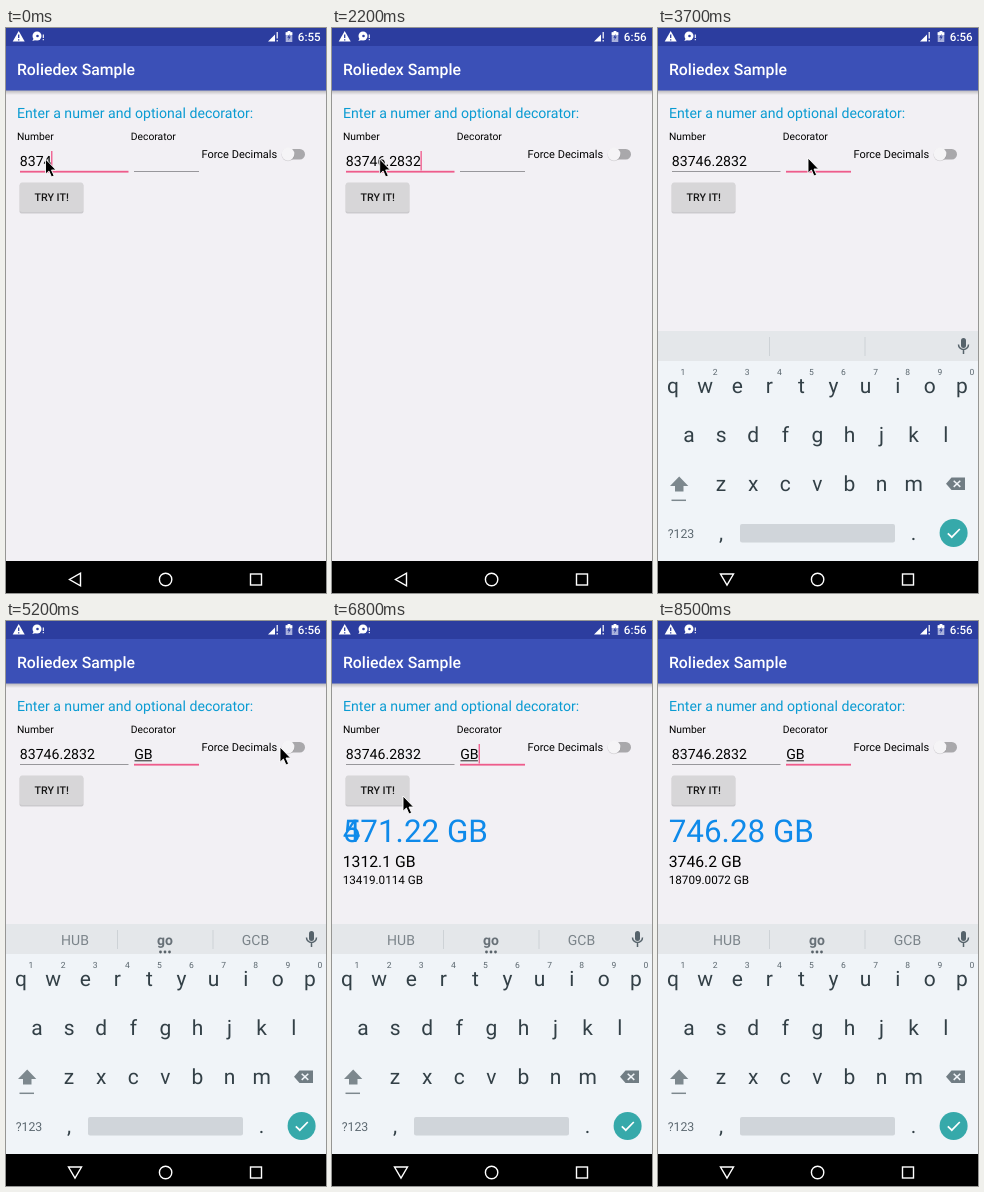
Animation, 320 px wide and 565 px high, one loop 8600 ms. Source, as an HTML page:

```html
<!DOCTYPE html>
<html lang="en">
<head>
<meta charset="utf-8">
<title>Rolling numbers</title>
<style>
  html, body { margin: 0; width: 100%; height: 100%; overflow: hidden; background: #f2f0f4; }
  svg { display: block; width: 100%; height: 100%; font-family: Roboto, sans-serif; text-rendering: geometricPrecision; }
  text { white-space: pre; }
  .mid { text-anchor: middle; }
  .med { font-weight: 500; }
</style>
</head>
<body>
<svg viewBox="0 0 320 565">
  <defs>
    <linearGradient id="fade" x2="0" y2="1">
      <stop stop-color="#000" stop-opacity=".25"/>
      <stop offset="1" stop-color="#000" stop-opacity="0"/>
    </linearGradient>
    <clipPath id="above"><rect width="320" height="533"/></clipPath>
  </defs>
  <rect width="320" height="565" fill="#f2f0f4"/>
  <rect y="62" width="320" height="5" fill="url(#fade)"/>
  <rect y="18" width="320" height="44.5" fill="#3b50b7"/>
  <rect width="320" height="18" fill="#2c3d9f"/>

  <!-- status bar -->
  <path d="M12.7 3 18.7 13.6H6.7Z" fill="#fff"/>
  <path d="M12.7 6.5V10M12.7 11.2V12.4" stroke="#2c3d9f" stroke-width="1.3"/>
  <circle cx="31" cy="8" r="4.5" fill="#fff"/>
  <path d="M28 10 26.3 13 30 12Z" fill="#fff"/>
  <circle cx="31.5" cy="8" r="1.3" fill="#2c3d9f"/>
  <path d="M37.3 6.5V10M37.3 11V12.2" stroke="#fff" stroke-width="1.1"/>
  <path d="M269 6.5V13.5H262Z" fill="#fff"/>
  <path d="M271.2 4V10.5M271.2 12V13.5" stroke="#fff" stroke-width="1.2"/>
  <path d="M281.7 3h2.6v1.3h2V14h-6.6V4.3h2Z" fill="#a9b1dc"/>
  <path d="M281.7 3h2.6v1.3h2V7h-6.6V4.3h2Z" fill="#fff"/>
  <path d="M283.7 5.7 281.3 9.7H282.8L282.3 12.5 284.8 8.6H283.2Z" fill="#2c3d9f"/>
  <text id="clock" class="med" x="291.8" y="13" font-size="11.6" fill="#fff"></text>

  <!-- form -->
  <text class="med" x="11" y="46.7" font-size="15.8" fill="#fff">Roliedex Sample</text>
  <text x="11" y="90" font-size="14.12" fill="#0a9bd2">Enter a numer and optional decorator:</text>
  <g fill="#000">
    <text x="11" y="112" font-size="10.3">Number</text>
    <text x="124.8" y="112" font-size="10.3">Decorator</text>
    <text x="195.5" y="130" font-size="11">Force Decimals</text>
    <text id="number" x="13.8" y="138" font-size="14.12"></text>
    <text id="unit" x="128.2" y="138" font-size="14.12"></text>
  </g>
  <rect id="numberLine" x="14" width="108.5"/>
  <rect id="unitLine" x="128" width="65"/>
  <rect id="compose" x="128.5" y="139.3" height="1" fill="#222"/>
  <rect id="caret" y="123" width="1.3" height="19.5" fill="#f0578a"/>
  <rect x="277" y="121" width="22" height="10.4" rx="5.2" fill="#a9a8ab"/>
  <circle cx="282" cy="126.6" r="6.6" fill="#000" opacity=".12"/>
  <circle cx="282" cy="126" r="6.4" fill="#f5f4f6"/>
  <rect x="13.5" y="155.5" width="64" height="30" rx="2" fill="#000" opacity=".16"/>
  <rect id="button" x="14" y="154.5" width="63" height="29.5" rx="1.8"/>
  <text class="mid med" x="45.7" y="173" font-size="10.7" fill="#161616">TRY IT!</text>

  <!-- results -->
  <g id="results">
    <text id="big" x="10.7" y="221" font-size="31.4" fill="#0e8aea"></text>
    <text id="ghost" x="10.7" y="221" font-size="31.4" fill="#0e8aea"></text>
    <text id="middle" x="10.7" y="246" font-size="15.75"></text>
    <text id="small" x="10.7" y="263" font-size="11.7"></text>
  </g>

  <!-- keyboard -->
  <g clip-path="url(#above)">
    <g id="keyboard">
      <rect y="303" width="320" height="230" fill="#f0f4f8"/>
      <rect y="303" width="320" height="30" fill="#e4e7ea"/>
      <path d="M111.5 309V328M207 309V328" stroke="#cdd2d6"/>
      <g id="hints" class="mid" font-size="14" fill="#7b848a">
        <text x="69" y="324">HUB</text>
        <text x="159" y="324" font-weight="700" fill="#687178">go</text>
        <text x="249.5" y="324">GCB</text>
        <g fill="#59636a">
          <circle cx="154.5" cy="331" r="1.4"/><circle cx="159" cy="331" r="1.4"/><circle cx="163.5" cy="331" r="1.4"/>
        </g>
      </g>
      <rect x="303" y="310" width="5" height="10" rx="2.5" fill="#56636b"/>
      <path d="M300.5 316.5a5 5 0 0 0 10 0M305.5 321.5V326" fill="none" stroke="#56636b" stroke-width="1.5"/>
      <g id="keys" class="mid" fill="#334047"></g>
      <path d="M21.2 448.5 30.3 458H25.5V463.5H17V458H12Z" fill="#7d888e"/>
      <path d="M13.5 472.3H28" stroke="#7d888e" stroke-width="1.5"/>
      <path d="M293.5 449.5H307V462H293.5L288 455.7Z" fill="#717d84"/>
      <path d="M295.7 452.7 302.3 458.9M302.3 452.7 295.7 458.9" stroke="#f0f4f8" stroke-width="1.5"/>
      <rect x="82" y="496" width="155" height="18.5" rx="2" fill="#d0d5da"/>
      <circle cx="295.6" cy="505" r="14" fill="#36a9aa"/>
      <path d="M289.8 505.3 293.8 509.2 301.8 501" fill="none" stroke="#fff" stroke-width="1.7"/>
    </g>
  </g>

  <!-- navigation bar -->
  <rect y="533" width="320" height="32" fill="#000"/>
  <g fill="none" stroke="#fff" stroke-width="1.4">
    <path id="back"/>
    <circle cx="159.6" cy="551.5" r="6.2"/>
    <rect x="244.5" y="546" width="11" height="11"/>
  </g>
  <path id="mouse" d="M0 0V15.2L3.4 12 6 18 8.6 16.8 6 11H10.6Z" fill="#000" stroke="#fff" stroke-width=".9"/>
</svg>
<script>
const LOOP = 8600, STEP = 100, PINK = '#ee5c8b';
const el = id => document.getElementById(id);
const set = (id, attrs) => { for (const k in attrs) el(id).setAttribute(k, attrs[k]); };
const say = (id, s) => { el(id).textContent = s; };
const show = (id, on) => set(id, { visibility: on ? 'visible' : 'hidden' });
const clamp = x => Math.max(0, Math.min(1, x));
const part = (t, a, b) => clamp((t - a) / (b - a));
const ease = x => x * x * (3 - 2 * x);

function key(s, x, y, size, fill) {
  const node = document.createElementNS('http://www.w3.org/2000/svg', 'text');
  const attrs = { x, y, 'font-size': size };
  if (fill) attrs.fill = fill;
  for (const k in attrs) node.setAttribute(k, attrs[k]);
  node.textContent = s;
  el('keys').append(node);
}
const PITCH = 32.1;
[['qwertyuiop', 15, 365], ['asdfghjkl', 31, 414], ['zxcvbnm', 63, 463]].forEach(([row, x, y]) =>
  [...row].forEach((c, i) => key(c, x + PITCH * i, y, 21)));
[...'1234567890'].forEach((c, i) => key(c, 25 + PITCH * i, 347.3, 8.5, '#5a666e'));
key('?123', 23, 509.5, 12.3, '#5c6870');
key(',', 63, 512, 21);
key('.', 255.5, 512, 21);

const numberKeys = [400, 800, 1200, 1500, 1800, 2000];
const unitKeys = [4200, 4600];
const FOCUS = 2800, PRESS = 6300, ROLL = 6400;
const path = [[0, 39.5, 131], [2100, 39.5, 131], [2700, 150, 130], [4600, 150, 130],
  [5200, 274, 126], [5500, 274, 126], [6200, 71, 175], [LOOP, 71, 175]];

const typed = (keys, t) => keys.filter(k => k <= t);

function mouseAt(t) {
  const i = path.findIndex(p => p[0] > t);
  const [a, b] = [path[i - 1], path[i]];
  const f = ease(part(t, a[0], b[0]));
  return [1, 2].map(k => a[k] + (b[k] - a[k]) * f);
}

// Wheels turn upwards and stop on the digits of the goal.
function wheels(goal, turns, left) {
  let i = 0;
  return goal.replace(/\d/g, d => {
    const pos = +d - turns[i++] * left + 1e-6;
    return ((Math.floor(pos) % 10) + 10) % 10;
  });
}

function results(t) {
  const left = 1 - part(t, 6800, 8000) + Math.max(0, 6800 - t) / 1200;
  const first = 7 - 2.5 * left, frac = first - Math.floor(first);
  const big = wheels('746.28', [2.5, 7, 5, 10, 6], left);
  say('big', (frac > .6 ? Math.ceil(first) + big.slice(1) : big) + ' GB');
  say('ghost', frac >= .4 && frac <= .6 ? Math.ceil(first) : '');
  const grown = part(t, ROLL, 7480);
  say('middle', '3746.2'.replace(/\d/g, d => Math.round(d * grown)) + ' GB');
  say('small', wheels('18709.0072', [10, 5, 3, 9, 10, 10, 9, 6, 8], Math.max(0, (8500 - t) / 1700)) + ' GB');
}

function render(t) {
  say('clock', t < 1000 ? '6:55' : '6:56');

  const nums = typed(numberKeys, t), units = typed(unitKeys, t);
  const number = '83746.2832'.slice(0, 4 + nums.length);
  const unit = 'GB'.slice(0, units.length);
  say('number', number);
  say('unit', unit);

  const inUnit = t >= FOCUS;
  const line = on => on ? { y: 142.8, height: 1.8, fill: PINK } : { y: 143, height: 1, fill: '#98979b' };
  set('numberLine', line(!inUnit));
  set('unitLine', line(inUnit));
  const width = id => el(id).textContent ? el(id).getComputedTextLength() : 0;
  set('compose', { width: Math.max(0, width('unit') - 1) });
  set('caret', { x: inUnit ? 128.2 + width('unit') : 13.4 + width('number') });
  const since = Math.max(0, inUnit ? FOCUS : 0, ...(inUnit ? units : nums));
  show('caret', (t - since) % 1000 < 500);

  const rise = 1 - (1 - part(t, 3000, 3400)) ** 2;
  set('keyboard', { transform: `translate(0 ${230 * (1 - rise)})` });
  show('keyboard', rise > 0);
  set('hints', { display: units.length ? 'inline' : 'none' });
  set('back', { d: rise > 0 ? 'M62.5 546H75.5L69 557Z' : 'M74.5 545.2V557.8L63.5 551.5Z' });

  set('button', { fill: t >= PRESS && t < PRESS + 200 ? '#c4c3c5' : '#d7d6d8' });
  show('results', t >= ROLL);
  if (t >= ROLL) results(t);

  set('mouse', { transform: `translate(${mouseAt(t)})` });
  show('mouse', t < 7800);
}

const start = performance.now();
function tick() {
  const t = (performance.now() - start) % LOOP;
  render(Math.floor(t / STEP) * STEP);
  requestAnimationFrame(tick);
}
tick();
</script>
</body>
</html>
```
